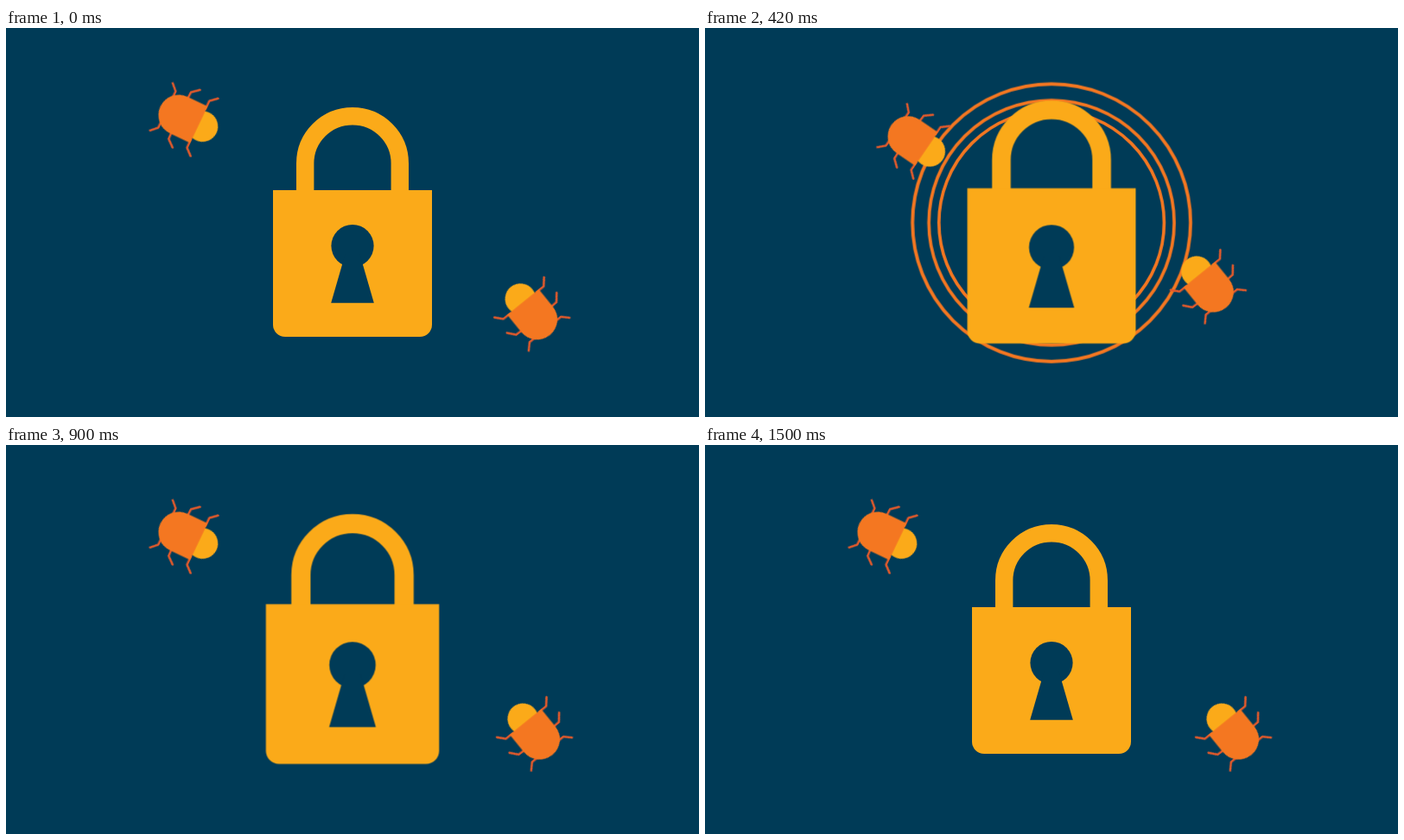
An HTML page that plays this animation: 802 by 451 pixels, repeating every 1.53 s.

```html
<!DOCTYPE html>
<html lang="en">
<head>
<meta charset="utf-8">
<title>Padlock and bugs</title>
<style>
  :root {
    --navy: #003b57;
    --yellow: #fbaa19;
    --orange: #f47721;
    --leg: #e2592b;
    --ease: cubic-bezier(.333, 0, .667, 1);
  }
  html, body { margin: 0; width: 100%; height: 100%; overflow: hidden; background: var(--navy); }
  svg { display: block; width: 100%; height: 100%; }

  .anim { animation: 1530ms var(--ease) infinite; }

  .lock { transform-origin: 401px 225.4px; animation-name: pulse; }
  @keyframes pulse {
    0%, 98.04%, 100% { transform: scale(1); }
    49.02% { transform: scale(1.1); }
  }

  /* Rings grow with their stroke, then thin out */
  .ring { fill: none; stroke: var(--orange); stroke-width: 4; transform-origin: 401px 225.7px; }
  .outer { animation-name: outer; }
  .middle { animation-name: middle; }
  .inner { animation-name: inner; }
  @keyframes outer {
    0% { transform: scale(0); stroke-width: 4; }
    29.74% { transform: scale(1); }
    35.6% { stroke-width: 4; animation-timing-function: linear; }
    41.2%, 100% { stroke-width: 0; }
    100% { transform: scale(1); }
  }
  @keyframes middle {
    0%, 3.92% { transform: scale(0); stroke-width: 4; }
    30.7% { stroke-width: 4; animation-timing-function: linear; }
    32.03%, 100% { transform: scale(1); }
    36.27%, 100% { stroke-width: 0; }
  }
  @keyframes inner {
    0%, 6.6% { transform: scale(0); stroke-width: 4; }
    28.1% { stroke-width: 4; animation-timing-function: linear; }
    31.76%, 100% { transform: scale(1); }
    34.3%, 100% { stroke-width: 0; }
  }

  /* The left bug arcs in, so x, y and turn are eased apart */
  .left-x { animation-name: left-x; }
  .left-y { animation-name: left-y; }
  .left-turn { animation-name: left-turn; transform-origin: 205.8px 104.2px; }
  @keyframes left-x {
    0% { transform: none; animation-timing-function: cubic-bezier(.33, 0, .52, 1); }
    23.07% { transform: translateX(44.5px); }
    37.58%, 100% { transform: none; }
  }
  @keyframes left-y {
    0% { transform: none; animation-timing-function: cubic-bezier(.33, 0, .93, 1); }
    23.07% { transform: translateY(33px); }
    37.58%, 100% { transform: none; }
  }
  @keyframes left-turn {
    0% { transform: rotate(0deg); animation-timing-function: cubic-bezier(.33, 0, .4, 1); }
    23.07% { transform: rotate(11.5deg); }
    37.58%, 100% { transform: rotate(0deg); }
  }

  /* The right bug is already moving when the loop restarts */
  .right { animation-name: right; }
  @keyframes right {
    0% { transform: translate(-2.8px, -3.2px); animation-timing-function: cubic-bezier(.33, .25, .67, 1); }
    21.44% { transform: translate(-37px, -44.4px); }
    42.03%, 100% { transform: translate(0, 0); }
  }
</style>
</head>
<body>
<svg viewBox="0 0 802 451">
  <defs>
    <g id="legs" fill="none" stroke="var(--leg)" stroke-width="2.5" stroke-linecap="round" stroke-linejoin="round">
      <path d="M-22.3 -30.4L-15.2 -23.3V-15M9.6 -37L1.3 -30L.9 -20M32.7 -37L24.8 -30V-20"/>
    </g>
    <g id="bug">
      <use href="#legs"/>
      <use href="#legs" transform="scale(1 -1)"/>
      <circle cx="30.5" r="17.8" fill="var(--yellow)"/>
      <path d="M25.7 -23.6H0A23.6 23.6 0 0 0 0 23.6H25.7Z" fill="var(--orange)"/>
    </g>
  </defs>

  <rect width="802" height="451" fill="var(--navy)"/>

  <circle class="anim ring outer" cx="401" cy="225.7" r="163.5"/>
  <circle class="anim ring middle" cx="401" cy="225.7" r="152.5"/>
  <circle class="anim ring inner" cx="401" cy="225.7" r="141"/>

  <g class="anim lock">
    <path d="M346.2 190V157a54.8 54.8 0 0 1 109.6 0V190" fill="none" stroke="var(--yellow)" stroke-width="20.4"/>
    <path d="M309 188H493V344a14 14 0 0 1 -14 14H323a14 14 0 0 1 -14 -14Z" fill="var(--yellow)"/>
    <g fill="var(--navy)">
      <circle cx="401" cy="252.6" r="24.6"/>
      <path d="M392.6 262H409.4L425.8 318.8H376.2Z"/>
    </g>
  </g>

  <g class="anim left-x"><g class="anim left-y"><g class="anim left-turn">
    <use href="#bug" transform="translate(200 101) rotate(25.5)"/>
  </g></g></g>

  <g class="anim right">
    <use href="#bug" transform="translate(617.4 341) rotate(-129)"/>
  </g>
</svg>
</body>
</html>
```
